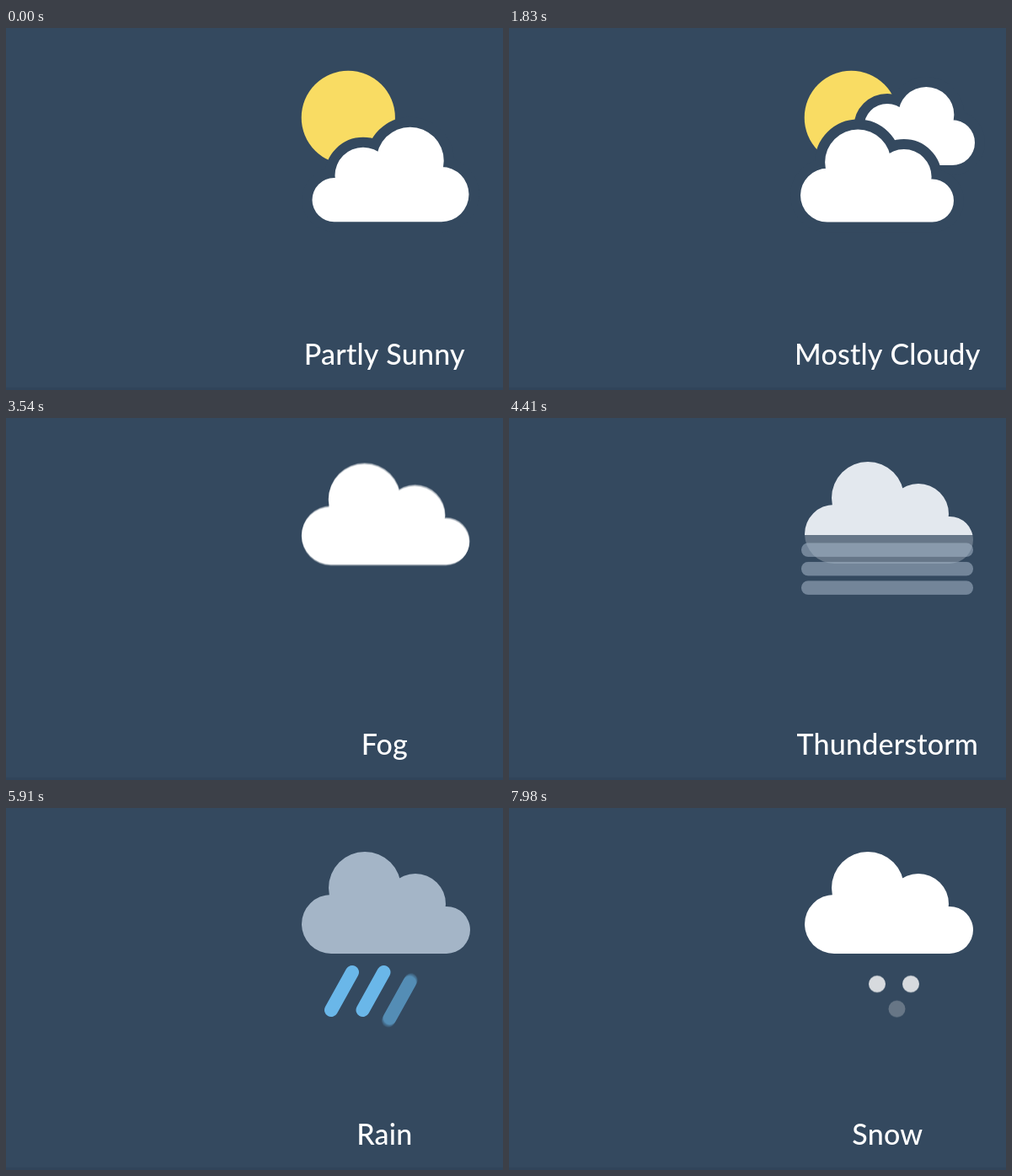
An HTML page with a canvas that plays this animation: 590x430 px, repeating every 8000 ms.

```html
<!DOCTYPE html>
<html lang="en">
<head>
<meta charset="utf-8">
<title>Weather icons</title>
<style>
  html, body { margin: 0; width: 100%; height: 100%; overflow: hidden; background: #34495f; }
  canvas { display: block; }
</style>
</head>
<body>
<canvas id="stage" width="590" height="430"></canvas>
<script>
const W = 590, H = 430, LOOP = 8000;
const BG = '#34495f', SUN = '#f9dc63', WHITE = [255, 255, 255], GREY = [164, 181, 199], BLUE = '#6ab7e9';
const FADE = 200, GAP = 12;

const screen = document.getElementById('stage').getContext('2d');
const layer = document.createElement('canvas');
layer.width = W;
layer.height = H;
const c = layer.getContext('2d');

const labels = [
  [-300, 'Partly Sunny'], [630, 'Partly Cloudy'], [1500, 'Mostly Cloudy'],
  [2280, 'Cloudy'], [3120, 'Fog'], [4200, 'Thunderstorm'], [5190, 'Rain'],
  [6000, 'Sleet'], [6790, 'Flurries'], [7560, 'Snow'], [9000, '']
];

let t = 0;
const ramp = (start, dur) => Math.min(1, Math.max(0, (t - start) / dur));
const out = p => 1 - (1 - p) ** 3;
const smooth = p => p * p * (3 - 2 * p);
const mix = (a, b, p) => a + (b - a) * p;
const rgb = (a, b, p) => `rgb(${a.map((v, i) => Math.round(mix(v, b[i], p)))})`;

// Runs a value through successive [start, duration, target, easing] steps.
const track = (value, ...steps) =>
  steps.reduce((v, [start, dur, to, ease = smooth]) => mix(v, to, ease(ramp(start, dur))), value);

const cloudPath = new Path2D();
for (const [x, y, r] of [[-25, -17.5, 43], [35, 1.5, 36], [-65, 25.5, 35], [72, 32.5, 28]]) {
  cloudPath.moveTo(x + r, y);
  cloudPath.arc(x, y, r, 0, 2 * Math.PI);
}
cloudPath.rect(-65, 4.5, 137, 56);

function cloud(x, y, size, { flip = 1, fill = '#fff', alpha = 1, gap = true } = {}) {
  if (alpha <= 0) return;
  c.save();
  c.globalAlpha = alpha;
  c.translate(x, y);
  c.scale(size * flip, size);
  if (gap) {
    c.lineWidth = 2 * GAP / size;
    c.lineJoin = 'round';
    c.strokeStyle = BG;
    c.stroke(cloudPath);
  }
  c.fillStyle = fill;
  c.fill(cloudPath);
  c.restore();
}

function dot(x, y, r, fill, alpha) {
  c.globalAlpha = alpha;
  c.fillStyle = fill;
  c.beginPath();
  c.arc(x, y, r, 0, 2 * Math.PI);
  c.fill();
  c.globalAlpha = 1;
}

function clipped(y, h, draw) {
  c.save();
  c.beginPath();
  c.rect(0, y, W, h);
  c.clip();
  draw();
  c.restore();
}

function sunAndClouds() {
  dot(406.3, 106.4, 55.6, SUN, 1 - ramp(2280, 300));

  const leave = 1 - ramp(3120, 280);
  const enter = ramp(2400, 300);
  cloud(mix(373, 413.3, out(enter)), 76.8, 0.583, { alpha: enter * leave });

  cloud(
    track(456.5, [630, 350, 491, out], [1500, 330, 476]),
    track(173.9, [630, 350, 133, out], [1500, 330, 116.5]),
    track(0.93, [630, 480, 0.583], [1500, 330, 0.77]),
    { flip: -1, alpha: leave }
  );

  cloud(
    track(382, [630, 350, 430, out], [1500, 330, 437], [3200, 380, 451]),
    track(179, [1500, 330, 175.5], [3200, 380, 112.4]),
    track(0.85, [1500, 330, 0.91], [3200, 380, 1]),
    { alpha: ramp(640, 250), gap: t < 3500 }
  );
}

function fog() {
  c.fillStyle = rgb(GREY, GREY, 0);
  for (let i = 0; i < 3; i++) {
    const enter = ramp(3580 + i * 45, 200), leave = ramp(4200, 500);
    c.globalAlpha = enter * (1 - leave);
    c.beginPath();
    c.roundRect(347, 147 + i * 22.5 - 8 * (1 - out(enter)) + leave * leave * 8, 204, 16.5, 8);
    c.fill();
  }
  c.globalAlpha = 1;
}

function mainCloud() {
  const storm = smooth(ramp(4200, 600));
  const tone = storm * (1 - ramp(7440, 300));
  const lower = 1 - ramp(3600, 200) * (1 - storm);
  const fill = rgb(WHITE, GREY, tone);
  const draw = alpha => cloud(451, 112.4, 1, { fill, alpha, gap: false });
  clipped(0, 139, () => draw(1));
  clipped(139, 60, () => draw(lower));
}

function bolt() {
  const enter = ramp(4530, 300), leave = ramp(5040, 220);
  c.save();
  c.globalAlpha = enter * (1 - leave);
  c.translate(0, leave * 14);
  c.fillStyle = SUN;
  c.beginPath();
  [[446, 187], [428, 226], [445, 226], [437, 258], [469, 214], [451, 214], [464, 187]]
    .forEach(([x, y]) => c.lineTo(x, y));
  c.fill();
  c.restore();
}

// Three slanted streaks; the rightmost one always goes first.
function streaks(color, order, enterAt, enterDur, leaveAt, leaveDur) {
  c.lineCap = 'round';
  c.lineWidth = 16;
  c.strokeStyle = color;
  for (let i = 0; i < 3; i++) {
    const enter = ramp(enterAt + i * order, enterDur);
    const leave = ramp(leaveAt + i * order, leaveDur);
    const x = 411 + (2 - i) * 37.5 + 8 * (1 - enter) - 17 * leave;
    const y = 195 - 14 * (1 - enter) + 30 * leave;
    c.globalAlpha = enter * (1 - leave);
    c.beginPath();
    c.moveTo(x, y);
    c.lineTo(x - 25, y + 45);
    c.stroke();
  }
  c.globalAlpha = 1;
}

function flakes() {
  [[468, 228], [430, 212], [446, 247]].forEach(([x, y], i) => {
    const enter = ramp(6810 + i * 200, 200), leave = ramp(7440 + i * 90, 210);
    dot(x, y - 8 * (1 - enter) + 20 * leave, 9, '#fff', enter * (1 - leave));
  });
  [[437, 211, 7820], [477, 211, 7820], [460.5, 246, 7930]].forEach(([x, y, start]) => {
    const enter = ramp(start, 200);
    dot(x, y - 10 * (1 - enter), 10, '#fff', enter);
  });
}

function caption() {
  c.font = '500 34px Lato, "Open Sans", sans-serif';
  c.letterSpacing = '0.2px';
  c.textAlign = 'center';
  c.fillStyle = '#fff';
  for (let i = 0; i < labels.length - 1; i++) {
    c.globalAlpha = ramp(labels[i][0], FADE) * (1 - ramp(labels[i + 1][0], FADE));
    if (c.globalAlpha) c.fillText(labels[i][1], 449.3, 399.5);
  }
  c.globalAlpha = 1;
}

function scene() {
  c.fillStyle = BG;
  c.fillRect(0, 0, W, H);
  c.fillStyle = '#30445a';
  c.fillRect(0, 427, W, 3);
  if (t < 3600) sunAndClouds();
  else mainCloud();
  fog();
  bolt();
  clipped(186, 100, () => {
    streaks(BLUE, 140, 5250, 200, 5835, 210);
    streaks('#fff', 140, 6060, 140, 6630, 145);
  });
  flakes();
  caption();
}

// Averages a few moments around the current time for motion blur.
function frame(now) {
  const time = now % LOOP, samples = 5, step = 6;
  for (let i = 0; i < samples; i++) {
    t = Math.min(LOOP, Math.max(0, time + (i - (samples - 1) / 2) * step));
    scene();
    screen.globalAlpha = 1 / (i + 1);
    screen.drawImage(layer, 0, 0);
  }
  requestAnimationFrame(frame);
}
requestAnimationFrame(frame);
</script>
</body>
</html>
```
